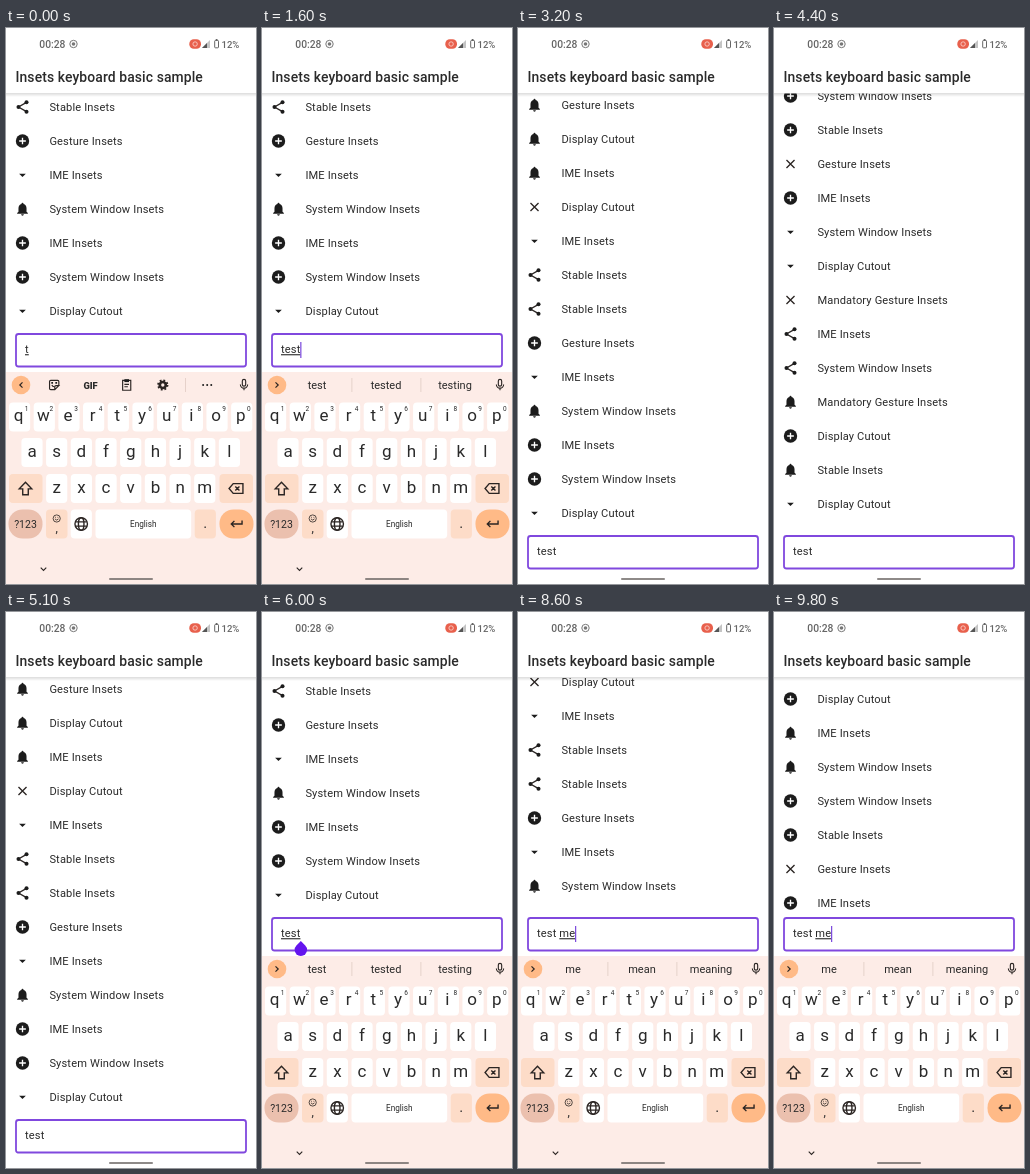
Write an HTML page that moves like this. It is 250 px wide and 556 px high and loops after 9.9 s.

```html
<!DOCTYPE html>
<html lang="en">
<head>
<meta charset="utf-8">
<title>Insets keyboard basic sample</title>
<style>
  html, body { margin: 0; width: 100%; height: 100%; overflow: hidden; background: #fff; }
  svg { display: block; width: 250px; height: 556px; font-family: Roboto, sans-serif; }
  text { white-space: pre; fill: #2a2a2a; }
  .mid { text-anchor: middle; }
  .row, #typed { font-size: 11.1px; letter-spacing: .14px; }
  .line { fill: none; stroke: #2b2523; stroke-width: 2; }
  #under { text-decoration: underline; }
</style>
</head>
<body>
<svg id="stage" viewBox="0 0 250 556"></svg>
<script>
const LOOP = 9900, STEP = 100, ROW = 34, KEYS_H = 212, NAV_H = 10;
const INK = '#1c1c1c', PEACH = '#fddcc8', ORANGE = '#ffba87', KEY_BG = '#fdece7';

// Icons on a 24-unit grid
const icons = {
  drop: '<path d="M7 10l5 5 5-5z"/>',
  add: '<circle cx="12" cy="12" r="10"/><path d="M7 12h10M12 7v10" stroke="#fff" stroke-width="2"/>',
  bell: '<path d="M12 22c1.1 0 2-.9 2-2h-4c0 1.1.9 2 2 2zm6-6v-5c0-3.1-1.6-5.6-4.5-6.3V4a1.5 1.5 0 0 0-3 0v.7C7.6 5.4 6 7.9 6 11v5l-2 2v1h16v-1z"/>',
  share: '<path class="line" d="M18 5L6 12l12 7"/><circle cx="18" cy="5" r="3"/><circle cx="6" cy="12" r="3"/><circle cx="18" cy="19" r="3"/>',
  close: '<path class="line" d="M6 6l12 12M18 6L6 18"/>',
  left: '<path class="line" d="M14.5 7.5L10 12l4.5 4.5"/>',
  right: '<path class="line" d="M9.5 7.5L14 12l-4.5 4.5"/>',
  down: '<path class="line" d="M8 10l4 4 4-4" style="stroke-width:1.6"/>',
  sticker: '<path class="line" d="M20 12V6a2 2 0 0 0-2-2H6a2 2 0 0 0-2 2v12a2 2 0 0 0 2 2h7l7-7h-5a2 2 0 0 0-2 2v5M8 12q1 3 4 3"/><path d="M7 7h3v3H7zM14 7h3v3h-3z"/>',
  clip: '<path class="line" d="M5 4h14v17H5zM8 11h8M8 15h6"/><path d="M8 2h8v5H8z"/>',
  gear: '<circle class="line" cx="12" cy="12" r="5.2" style="stroke-width:4.6"/><circle class="line" cx="12" cy="12" r="8" style="stroke-width:3.4" stroke-dasharray="3.1 3.183"/>',
  more: '<circle cx="5" cy="12" r="1.7"/><circle cx="12" cy="12" r="1.7"/><circle cx="19" cy="12" r="1.7"/>',
  mic: '<rect x="9" y="2" width="6" height="12" rx="3" class="line"/><path class="line" d="M5.500 11a6.500 6.500 0 0 0 13 0M12 17.500v4"/>',
  shift: '<path class="line" d="M12 3L3 12.500h5V21h8v-8.500h5z"/>',
  erase: '<path class="line" d="M8 5h14v14H8l-6-7zM11 9l6 6M17 9l-6 6"/>',
  globe: '<circle class="line" cx="12" cy="12" r="9"/><ellipse class="line" cx="12" cy="12" rx="4" ry="9"/><path class="line" d="M4 9h16M4 15h16"/>',
  smile: '<circle class="line" cx="12" cy="12" r="9"/><path class="line" d="M7.500 13q4.500 6 9 0M8 9h2M14 9h2"/>',
  enter: '<path class="line" d="M20 7v5H5M9 7.500L4.500 12 9 16.500"/>'
};

const icon = (name, x, y, scale = .694) =>
  `<g transform="translate(${x} ${y}) scale(${scale}) translate(-12 -12)" fill="${INK}">${icons[name]}</g>`;
const rect = (x, y, w, h, fill, r = 0, more = '') =>
  `<rect x="${x}" y="${y}" width="${w}" height="${h}" rx="${r}" fill="${fill}" ${more}/>`;
const label = (s, x, y, size, more = 'class="mid"') =>
  `<text x="${x}" y="${y}" font-size="${size}" ${more}>${s}</text>`;

// List rows, bottom to top: inset type, icon
const types = {
  D: 'Display Cutout', W: 'System Window Insets', I: 'IME Insets',
  G: 'Gesture Insets', S: 'Stable Insets', M: 'Mandatory Gesture Insets'
};
const marks = { v: 'drop', p: 'add', b: 'bell', s: 'share', x: 'close' };
const rows = ('Dv Wp Ip Wb Iv Gp Ss Ss Iv Dx Ib Db Gb ' +
  'Dv Sb Dp Mb Ws Is Mx Dv Wv Ip Gx Sp Wp Wb Ib Dp').split(' ');
const listRows = rows.map(([type, mark], i) =>
  icon(marks[mark], 16.5, -ROW * i, .67) +
  `<text class="row" x="43.4" y="${4.1 - ROW * i}">${types[type]}</text>`).join('');

const PITCH = 24.68;
const letterRow = (letters, x, y, digits = '') => [...letters].map((c, i) => {
  const cx = x + i * PITCH;
  return rect(cx - 10.6, y - 14.5, 21.2, 29, '#fff', 4) +
    label(c, cx - (digits ? 1 : 0), y + 4.3, 17) +
    (digits ? label(digits[i], cx + 7, y - 6.2, 6.5) : '');
}).join('');

const keyboard =
  rect(0, 344, 250, KEYS_H, KEY_BG) +
  '<g id="tools"></g>' + icon('mic', 238, 357, .56) +
  letterRow('qwertyuiop', 13.6, 389, '1234567890') +
  letterRow('asdfghjkl', 26, 424.5) +
  letterRow('zxcvbnm', 50.700, 460.5) +
  rect(3, 446, 33.500, 29, PEACH, 4) + icon('shift', 19.5, 460.5) +
  rect(213.5, 446, 33.500, 29, PEACH, 4) + icon('erase', 230, 460.5) +
  rect(2.5, 481.500, 34, 29, '#ebc0ae', 14) + label('?123', 19.5, 500, 10.5) +
  rect(40, 481.500, 21.5, 29, PEACH, 4) + icon('smile', 50.700, 490.5, .4) + label(',', 50.700, 504, 12) +
  rect(64.700, 481.500, 21.2, 29, '#fff', 4) + icon('globe', 75.2, 496) +
  rect(89.5, 481.500, 95.700, 29, '#fff', 4) + label('English', 137.3, 499, 8.2) +
  rect(188.700, 481.500, 21.2, 29, PEACH, 4) + label('.', 199.3, 500, 15) +
  rect(213.5, 481.500, 34, 29, ORANGE, 14) + icon('enter', 230.5, 496) +
  rect(12.500, 527, 49.5, 28, '#ded0ca', 14, 'id="ripple"') +
  icon('down', 37.500, 541);

const statusBar =
  label('00:28', 33.300, 19.700, 10.3, 'font-weight="500" style="fill:#666"') +
  '<circle cx="67.5" cy="16" r="3.7" fill="none" stroke="#777"/><circle cx="67.5" cy="16" r="1.8" fill="#777"/>' +
  rect(183.300, 11.300, 11.700, 9.400, '#e8604c', 4.5) +
  '<circle cx="189.1" cy="16" r="2.2" fill="none" stroke="#fbd9d3" stroke-width=".8"/>' +
  '<path d="M204 12v8h-8z" fill="#c4c4c4"/><path d="M201 15v5h-5z" fill="#555"/>' +
  rect(208.700, 12.500, 3.800, 7.300, 'none', .7, 'stroke="#666"') + rect(209.700, 11, 1.800, 1.5, '#666') +
  label('12%', 215.5, 19.700, 9.5, 'font-weight="500" style="fill:#666"');

stage.innerHTML = `
  <defs><linearGradient id="shade" x2="0" y2="1">
    <stop stop-opacity=".14"/><stop offset="1" stop-opacity="0"/>
  </linearGradient></defs>
  <g id="list">${listRows}</g>
  ${rect(0, 0, 250, 65.500, '#fff')}${rect(0, 65, 250, 4, 'url(#shade)')}
  ${statusBar}
  ${label('Insets keyboard basic sample', 9.500, 53.800, 13.9, 'font-weight="500" letter-spacing=".104"')}
  <g id="field">
    ${rect(0, 502, 250, 260, '#fff')}
    ${rect(10, 508, 230, 32.500, '#fff', 2.5, 'stroke="#8048de" stroke-width="1.8"')}
    <text id="typed" x="19" y="527.2"><tspan id="plain"></tspan><tspan id="under"></tspan></text>
    ${rect(-.6, 516, 1.2, 16, '#7a48dc', 0, 'id="cursor"')}
  </g>
  <g id="keys">${keyboard}</g>
  <path id="handle" d="M0 329l4.400 4.400a6.200 6.200 0 1 1-8.800 0z" fill="#6414ee"/>
  ${rect(103, 550.2, 44, 1.600, '#6a6462', .8)}`;

const $ = id => document.getElementById(id);
const move = (id, x, y) => $(id).setAttribute('transform', `translate(${x} ${y})`);
const show = (id, on) => $(id).style.display = on ? '' : 'none';

const divider = x => rect(x, 350, .8, 14, '#e0cbc3');
const toggle = name => `<circle cx="15" cy="357" r="9.3" fill="${ORANGE}"/>` + icon(name, 15, 357, .6);
const allTools = toggle('left') + icon('sticker', 48.200, 357, .58) +
  label('GIF', 84.500, 360.5, 9.3, 'class="mid" font-weight="900"') +
  icon('clip', 120.700, 357, .58) + icon('gear', 156.800, 357, .58) +
  divider(179) + icon('more', 201.200, 357, .58);
const suggest = words => toggle('right') + (words && words.split(' ').map((w, i) =>
  label(w, 55 + 69 * i, 361, 11) + (i ? divider(20.5 + 69 * i) : '')).join(''));

// Start time, settled text, text being composed, suggestions
const typing = [
  [0, '', 't'],
  [100, '', 'te', 'test tested testing'],
  [200, '', 'tes', 'test tested testing'],
  [300, '', 'test', 'test tested testing'],
  [2900, 'test', '', ''],
  [5600, '', 'test', 'test tested testing'],
  [7000, 'test ', '', 'is and for'],
  [7200, 'test ', 'm', 'm me my'],
  [7400, 'test ', 'me', 'me mean meaning']
];
const blinks = [100, 1000, 1600, 2100, 2600, 3100, 3600, 4100, 4600, 5100, 5400, 6000, 6600, 8100, 8600, 9100, 9600];
const scroll = [[3400, 0], [3500, 25], [3700, 150], [3900, 280], [4100, 370], [4400, 433],
  [4500, 400], [4700, 250], [4900, 90], [5100, 0], [8300, 0], [8400, 12], [8500, 45], [8600, 93],
  [8700, 180], [8800, 290], [9000, 475], [9200, 600], [9400, 685], [9600, 735], [9800, 756]];
const opening = [[2900, 1], [3000, .75], [3100, .2], [3200, 0],
  [5100, 0], [5200, .35], [5300, .8], [5400, .97], [5500, 1]];

function at(points, t) {
  const i = points.findIndex(p => p[0] > t);
  if (i < 0) return points.at(-1)[1];
  if (!i) return points[0][1];
  const [t0, a] = points[i - 1], [t1, b] = points[i];
  return a + (b - a) * (t - t0) / (t1 - t0);
}

let last = -1;
function draw(now) {
  requestAnimationFrame(draw);
  const t = Math.floor(now % LOOP / STEP) * STEP;
  if (t === last) return;
  last = t;

  const shown = KEYS_H * at(opening, t), lift = Math.max(0, shown - NAV_H);
  move('list', 0, 485 - lift + at(scroll, t));
  move('field', 0, -lift);
  move('keys', 0, KEYS_H - shown);

  const [, done, composing, words] = typing.findLast(s => s[0] <= t);
  $('plain').textContent = done;
  $('under').textContent = composing;
  $('tools').innerHTML = words === undefined ? allTools : suggest(words);

  const end = 19.400 + $('typed').getComputedTextLength();
  move('cursor', end, 0);
  move('handle', end, 202 - lift);
  show('cursor', blinks.filter(b => b <= t).length % 2);
  show('handle', t >= 5400 && t < 7000);
  show('ripple', t === 2900);
}
requestAnimationFrame(draw);
</script>
</body>
</html>
```
